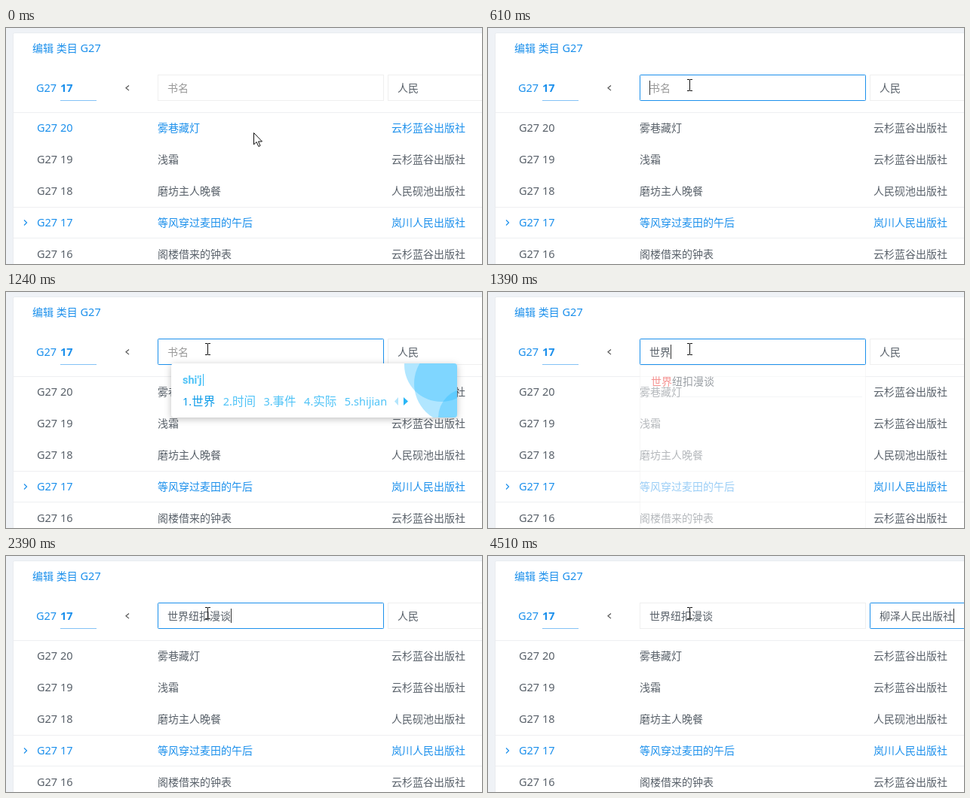
An HTML page that plays this animation: 631x314 px, repeating every 4970 ms.

```html
<!DOCTYPE html>
<html lang="zh-CN">
<head>
<meta charset="utf-8">
<style>
  html, body { margin: 0; width: 100%; height: 100%; overflow: hidden; background: #eff2f6; }
  svg { display: block; width: 631px; height: 314px; }
  text { font: 14.5px "Noto Sans", "Open Sans", sans-serif; fill: #586069; white-space: pre; }
  .han { font-family: "Noto Sans CJK SC", "Noto Sans CJK", sans-serif; font-size: 14px; }
  .blue, .blue text { fill: #1c90ec; }
  .bold { font-weight: 700; }
  .hint { fill: #999; }
  .hit { fill: #f04a48; }
  .white { fill: #fff; }
  .spell { font: 700 14.5px Roboto, sans-serif; fill: #4fc3f7; }
  .picks { fill: #4fc3f7; }
  .picks .han { font-size: 15.5px; }
  .first { fill: #0a9ae8; }
  .field { fill: #fff; stroke: #efefef; }
  .focus { fill: none; stroke: #1c90ec; rx: 1px; }
  .line { fill: #eeeff1; }
  .chevron { fill: none; stroke-width: 1.2; }
  #ime > .card { fill: #fff; filter: drop-shadow(0 2px 5px rgba(0, 0, 0, .25)); }
  #skin circle { fill: #29bbff; opacity: .36; }
</style>
</head>
<body>
<svg viewBox="0 0 631 314">
  <defs><clipPath id="cardClip"><rect x="219" y="95" width="379" height="72" rx="4"/></clipPath></defs>
  <rect width="631" height="314" fill="#eff2f6"/>
  <rect x="9.5" y="6.5" width="640" height="330" rx="2" fill="#fff" stroke="#e9ecf0"/>
  <g id="page"></g>
  <g id="titleField"></g>
  <g id="pressField"></g>
  <g id="titleList"></g>
  <g id="pressList"></g>
  <g id="ime">
    <rect class="card" x="219" y="95" width="379" height="72" rx="4"/>
    <g id="skin" clip-path="url(#cardClip)">
      <circle cx="577" cy="97" r="49"/>
      <circle cx="594" cy="122" r="53"/>
      <circle cx="612" cy="167" r="39"/>
    </g>
    <text id="spell" class="spell" x="234" y="122"></text>
    <rect id="imeCaret" y="109" width="1" height="16" fill="#29b6f6"/>
    <text id="picks" class="picks" x="234" y="151"></text>
    <g id="pager">
      <path d="M5 140v11l-5-5.500z" fill="#b3e5fc"/>
      <path d="M12 140v11l6-5.500z" fill="#29b6f6"/>
    </g>
  </g>
  <path id="arrow" d="M.5 .5V16l3.600-3.400 2.700 6 2.300-1-2.600-5.600h5z" fill="#fff" stroke="#111"/>
  <path id="beam" d="M-3.500-7.500h3l.5 .5 .5-.5h3M-3.500 7.500h3l.5-.5 .5 .5h3M0-7V7" fill="none" stroke="#111"/>
</svg>
<script>
const $ = id => document.getElementById(id);
const LOOP = 4970;

const han = s => s.replace(/[\u4e00-\u9fff]+/g, '<tspan class="han">$&</tspan>');
const text = (x, y, s, cls = '') => `<text x="${x}" y="${y}" class="${cls}">${han(s)}</text>`;
const rect = (x, y, w, h, attrs) => `<rect x="${x}" y="${y}" width="${w}" height="${h}" ${attrs}/>`;
const line = (x, y, w) => rect(x, y, w, 1, 'class="line"');

const rows = [
  ['20', '雾巷藏灯', '云杉蓝谷出版社'],
  ['19', '浅霜', '云杉蓝谷出版社'],
  ['18', '磨坊主人晚餐', '人民砚池出版社'],
  ['17', '等风穿过麦田的午后', '岚川人民出版社'],
  ['16', '阁楼借来的钟表', '云杉蓝谷出版社']
];
const book = '世界纽扣漫谈';
const presses = ['人民砚池出版社', '岚川人民出版社', '柳泽人民出版社', '桐岭人民出版社'];

const rowMarkup = ([no, title, press], i) => {
  const y = 138 + 42 * i;
  return `<g id="row${i}" class="${i === 3 ? 'blue' : ''}">` +
    text(41, y, 'G27 ' + no) + text(201, y, title) + text(511, y, press) + '</g>';
};

$('page').innerHTML =
  text(35, 32, '编辑 类目 G27', 'blue') + text(40, 85, 'G27', 'blue') + text(72, 85, '17', 'blue bold') +
  rect(72, 96, 48, 1, 'fill="#84c2f6"') +
  '<path class="chevron" stroke="#555" d="M163 76.500l-4 3.300 4 3.300"/>' +
  '<path class="chevron" stroke="#1c90ec" d="M24 255.500l3.500 3.500-3.500 3.500"/>' +
  line(10, 112, 621) + line(10, 238, 621) + line(10, 279, 621) +
  rows.map(rowMarkup).join('');

function field(x, w, value, { hint = '', focus = 0, caret = -1, selected = false }) {
  const tx = x + 13;
  const box = `x="${x + .5}" y="62.5" width="${w - 1}" height="34"`;
  const width = value.length * 14;
  return `<rect class="field" ${box}/><rect class="focus" ${box} opacity="${focus}"/>` +
    (selected ? rect(tx, 70, width, 19, 'fill="#338fff"') : '') +
    text(tx, 85, value || hint, selected ? 'white' : value ? '' : 'hint') +
    (caret < 0 ? '' : rect(tx + caret * 14, 70, 1, 19, 'fill="#333"'));
}

function list(x, w, items, key) {
  const mark = s => s.split(key).map(han).join(`<tspan class="han hit">${key}</tspan>`);
  return rect(x + .5, 97.5, w - 1, 240, 'fill="#fff" fill-opacity=".93" stroke="#f3f3f3"') +
    items.map((s, i) => `<text x="${x + 15}" y="${124 + 42 * i}">${mark(s)}</text>` +
      line(x + 1, 139 + 42 * i, w - 6)).join('');
}

$('titleList').innerHTML = list(201, 300, [book], '世界');
$('pressList').innerHTML = list(506, 300, presses, '人民');

// Each step overrides part of the state from its time on
const start = {
  x: 328, y: 139, beam: false, hover: true,
  title: '', titleFocus: 0, titleCaret: -1, titleList: 0,
  press: '人民', pressFocus: 0, pressCaret: -1, selected: false, pressList: 0,
  spell: '', picks: ''
};
const steps = [
  [80, { x: 316, y: 124 }],
  [150, { x: 291, y: 98, hover: false }],
  [230, { x: 273, y: 80, beam: true }],
  [310, { x: 267, y: 76 }],
  [460, { titleFocus: .35, titleCaret: 0 }],
  [530, { titleFocus: .75 }],
  [610, { titleFocus: 1 }],
  [1010, { titleCaret: -1, spell: 's', picks: '是 说 上 时 三' }],
  [1090, { spell: 'sh', picks: '是 上 说 时 生' }],
  [1160, { spell: 'shi', picks: '是 时 使 事 十' }],
  [1240, { spell: "shi'j", picks: '世界 时间 事件 实际 shijian' }],
  [1320, { spell: "shi'jie", picks: '世界 使节 时节 视界 shijie' }],
  [1390, { spell: '', title: '世界', titleCaret: 2, titleList: .6 }],
  [1470, { titleList: 1 }],
  [1840, { titleCaret: -1 }],
  [2310, { title: book, titleCaret: 6, titleList: .4 }],
  [2390, { titleList: 0 }],
  [2940, { titleCaret: -1, titleFocus: .6, pressFocus: .4, selected: true, pressList: .35 }],
  [3020, { titleFocus: .2, pressFocus: .8, pressList: .8 }],
  [3090, { titleFocus: 0, pressFocus: 1, pressList: 1 }],
  [4510, { press: presses[2], selected: false, pressCaret: 7, pressList: 0 }]
];

function drawIme(s) {
  $('ime').style.display = s.spell ? '' : 'none';
  if (!s.spell) return;
  $('spell').textContent = s.spell;
  $('picks').innerHTML = s.picks.split(' ').map((w, i) => {
    const parts = han(`${i + 1}.${w}`);
    return `<tspan dx="${i ? 10.5 : 0}" class="${i ? '' : 'first'}">${parts}</tspan>`;
  }).join('');
  $('imeCaret').setAttribute('x', Math.round(235 + $('spell').getComputedTextLength()));
  const box = $('picks').getBBox();
  $('pager').setAttribute('transform', `translate(${Math.round(box.x + box.width + 10)} 0)`);
}

function draw(s) {
  $('row0').setAttribute('class', s.hover ? 'blue' : '');
  $('titleField').innerHTML = field(201, 300, s.title, { hint: '书名', focus: s.titleFocus, caret: s.titleCaret });
  $('pressField').innerHTML = field(506, 300, s.press, { focus: s.pressFocus, caret: s.pressCaret, selected: s.selected });
  $('titleList').setAttribute('opacity', s.titleList);
  $('pressList').setAttribute('opacity', s.pressList);
  drawIme(s);
  for (const [id, on] of [['arrow', !s.beam], ['beam', s.beam]]) {
    $(id).style.display = on ? '' : 'none';
    $(id).setAttribute('transform', `translate(${s.x + (s.beam ? .5 : 0)} ${s.y})`);
  }
}

let shown = -1;
const origin = performance.now();
function tick() {
  const t = Math.max(0, performance.now() - origin) % LOOP;
  const past = steps.filter(([at]) => at <= t);
  if (past.length !== shown) {
    shown = past.length;
    draw(Object.assign({}, start, ...past.map(([, change]) => change)));
  }
  requestAnimationFrame(tick);
}
tick();
</script>
</body>
</html>
```
